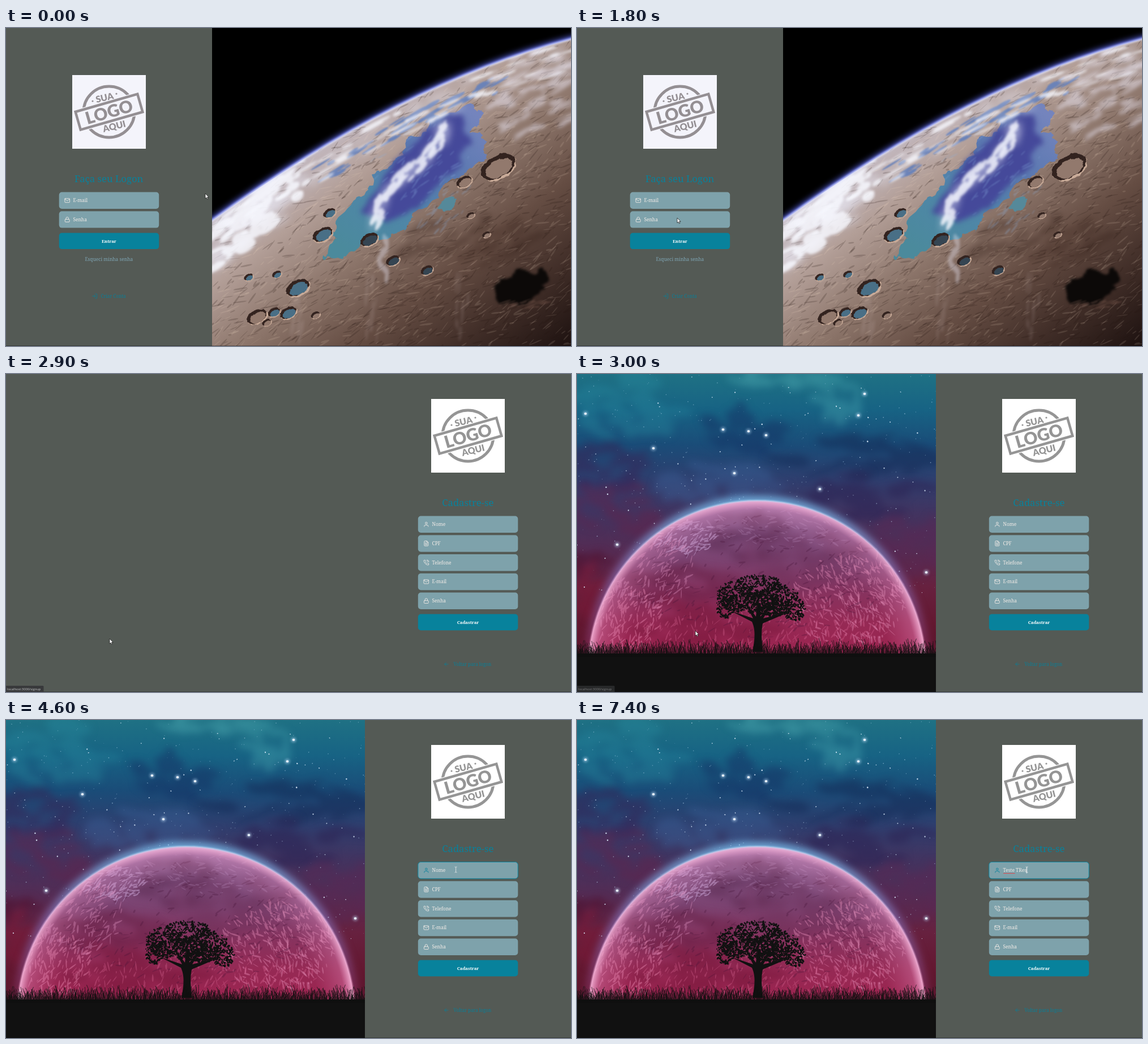
Animation, 998 px wide and 561 px high, one loop 8 s. Source, as an HTML page with a canvas:

```html
<!DOCTYPE html>
<html lang="pt">
<head>
<meta charset="utf-8">
<title>Logon</title>
<style>
  html, body { margin: 0; width: 100%; height: 100%; overflow: hidden; background: #545a55; }
  canvas, svg { position: absolute; left: 0; top: 0; }
  #planet { left: 364px; }
  text { font: 8.4px "Noto Serif", serif; fill: #f4ede8; white-space: pre; }
  .title { font-size: 16.7px; font-weight: 500; fill: #08829c; text-anchor: middle; }
  .action { font-size: 7.7px; font-weight: 700; fill: #fff; text-anchor: middle; }
  .link { --c: #0a7f97; }
  .link.hover { --c: #0c6473; }
  .link text { font-size: 8.1px; fill: var(--c); }
  .stamp text { font-family: Lato, sans-serif; font-weight: 900; text-anchor: middle; fill: var(--ink); }
  #status text { font: 5.8px "Open Sans", sans-serif; fill: #c4c6c8; }
  .line { fill: none; stroke-width: 2; stroke-linecap: round; stroke-linejoin: round; }
</style>
</head>
<body>
<canvas id="planet" width="634" height="561"></canvas>
<canvas id="moon" width="634" height="561"></canvas>
<svg id="ui" width="998" height="561" viewBox="0 0 998 561"></svg>
<script>
const $ = id => document.getElementById(id);
const TEAL = '#08829c', FIELD = '#7ea2ab', PALE = '#f4ede8';

// ---------- seeded drawing helpers ----------
let seed = 4711;
const rnd = () => (seed = seed * 16807 % 2147483647) / 2147483647;
const R = (a, b) => a + (b - a) * rnd();

function soften(g, blur, draw) {
  g.save();
  g.filter = blur ? `blur(${blur}px)` : 'none';
  draw();
  g.restore();
}

// Fill n ellipses, each given by place(i / n) as [x, y, rx, ry, angle].
function scatter(g, color, blur, n, place) {
  soften(g, blur, () => {
    g.fillStyle = color;
    g.beginPath();
    for (let i = 0; i < n; i++) {
      const [x, y, a, b, r = 0] = place(i / n);
      g.moveTo(x + a * Math.cos(r), y + a * Math.sin(r));
      g.ellipse(x, y, a, b, r, 0, 7);
    }
    g.fill();
  });
}

function inEllipse(x, y, rx, ry) {
  const a = R(0, 6.283), d = Math.sqrt(rnd());
  return [x + rx * d * Math.cos(a), y + ry * d * Math.sin(a)];
}

// Closed outline with a ragged, coast-like edge.
function ragged(points, amp) {
  for (let k = 0; k < 4; k++, amp *= .55)
    points = points.flatMap((p, i) => {
      const q = points[(i + 1) % points.length];
      return [p, [(p[0] + q[0]) / 2 + R(-amp, amp), (p[1] + q[1]) / 2 + R(-amp, amp)]];
    });
  const path = new Path2D();
  points.forEach(p => path.lineTo(...p));
  path.closePath();
  return path;
}

function gradient(g, x0, y0, x1, y1, ...colors) {
  const fill = g.createLinearGradient(x0, y0, x1, y1);
  colors.forEach((c, i) => fill.addColorStop(i / (colors.length - 1), c));
  return fill;
}

// ---------- planet ----------
function drawPlanet(g) {
  const limb = new Path2D('M-20 354L0 340Q337 97 634 20L654 15');
  const ground = new Path2D('M0 340Q337 97 634 20V561H0Z');
  const onLimb = t => [674 * t * (1 - t) + 634 * t * t, 340 * (1 - t) ** 2 + 194 * t * (1 - t) + 20 * t * t];
  const rim = (color, width, blur) => soften(g, blur, () => {
    g.strokeStyle = color;
    g.lineWidth = width;
    g.stroke(limb);
  });
  g.fillRect(0, 0, 634, 561);
  rim('#3f479f', 13, 5);
  rim('#7682ec', 6, 2);
  g.save();
  g.clip(ground);
  g.fillStyle = gradient(g, 210, 150, 560, 610, '#c9c2cf', '#b39f98', '#8d766b', '#654d43', '#412e28', '#1f1311');
  g.fillRect(0, 0, 634, 561);

  const streak = () => [R(0, 634), R(0, 561), R(3, 13), R(.4, 1.6), R(-1, -.1)];
  for (let k = 0; k < 3; k++) {
    scatter(g, 'rgba(38,22,18,.2)', 0, 520, streak);
    scatter(g, 'rgba(236,212,194,.13)', 0, 420, streak);
  }
  scatter(g, 'rgba(50,30,24,.3)', 5, 24, () => [...inEllipse(450, 380, 130, 50), R(10, 35), R(3, 9), -.5]);

  // sea
  const sea = ragged([[198, 410], [222, 370], [218, 345], [276, 285], [291, 252], [336, 225], [351, 190], [396, 158],
    [456, 133], [480, 150], [455, 185], [486, 200], [481, 235], [436, 265], [401, 300], [351, 340], [326, 362], [276, 382], [236, 403]], 11);
  g.fillStyle = gradient(g, 430, 130, 250, 400, '#7484bd', '#5a78b0', '#4f86a8', '#4b8a9c');
  g.fill(sea);
  soften(g, 5, () => {
    g.fillStyle = '#45499a';
    g.fill(ragged([[265, 330], [305, 260], [370, 190], [440, 150], [460, 205], [440, 245], [380, 300], [310, 345]], 12));
  });
  scatter(g, 'rgba(140,180,225,.3)', 1, 90, () => [...inEllipse(370, 265, 90, 100), R(3, 12), R(.5, 1.6), R(-1.1, -.4)]);
  scatter(g, '#6b83b8', 1, 45, () => {
    const [x, y] = onLimb(R(.25, .75));
    return [x + R(5, 30), y + R(18, 50), R(6, 22), R(1, 4), -.55];
  });
  g.fillStyle = '#55899a';
  g.fill(ragged([[398, 318], [420, 298], [432, 302], [418, 322]], 5));

  // clouds
  for (const [color, blur, n] of [['rgba(240,242,255,.6)', 7, 45], ['rgba(248,249,255,.8)', 2, 60]]) {
    scatter(g, color, blur, n, t => [R(-10, 30) + 135 * t, 392 - 115 * t + R(-48, 35), R(8, 28), R(3, 9), R(-.8, -.4)]);
    scatter(g, color, blur, n, () => {
      const t = rnd(), [x, y] = onLimb(t), d = R(5, 48);
      return [x + d * .5, y + d, R(8, 30), R(.8, 3.2), -.62 + .35 * t];
    });
    scatter(g, color, blur, n, t => [410 - 130 * t + 14 * Math.sin(t * 7) + R(-9, 9), 170 + 180 * t + R(-8, 8), R(5, 17), R(1.5, 5), R(-1.2, -.7)]);
  }
  scatter(g, 'rgba(236,232,246,.5)', 3, 60, () => [...inEllipse(570, 115, 85, 75), R(6, 28), R(1, 5), R(-.7, -.1)]);
  scatter(g, 'rgba(230,228,240,.4)', 2, 30, t => [302 + 8 * Math.sin(t * 9), 370 + 75 * t, R(1, 3), R(4, 12)]);
  scatter(g, 'rgba(220,205,205,.12)', 2, 40, () => [[150, 280, 440][rnd() * 3 | 0] + R(-12, 12), R(440, 540), R(1, 3), R(8, 22), .1]);

  // craters: x, y, radius, tint
  const craters = [[152, 459, 21, 1], [135, 503, 15, 1], [110, 502, 11, 1], [80, 510, 18, 0], [97, 520, 8, 0],
    [183, 507, 8, 0], [380, 428, 11, 2], [320, 411, 12, 2], [196, 365, 18, 1], [278, 374, 16, 2], [65, 440, 8, 1],
    [115, 435, 8, 1], [457, 331, 7, 0], [485, 365, 7, 0], [506, 246, 31, 0], [208, 327, 11, 1], [446, 272, 14, 0]];
  const tints = ['#92796d', '#496f86', '#354552'];
  for (const [x, y, r, tint] of craters) {
    const oval = (color, dx, dy, k) => {
      g.fillStyle = color;
      g.fill(ragged(Array.from({ length: 10 }, (_, i) => {
        const a = i * .6283, u = r * k * Math.cos(a), v = r * k * .58 * Math.sin(a);
        return [x + dx + u * .88 + v * .47, y + dy - u * .47 + v * .88];
      }), r * .07));
    };
    oval('#c9ab98', 1, 1, 1.1);
    oval('#33231f', -1, -1, 1.08);
    oval(tints[tint], 1, 1, .86);
  }
  soften(g, 2, () => {
    g.fillStyle = '#0c0908';
    g.fill(ragged([[502, 470], [510, 442], [540, 425], [575, 424], [594, 438], [588, 462], [562, 482], [528, 487]], 9));
  });
  scatter(g, 'rgba(140,105,90,.3)', 1, 24, () => [...inEllipse(548, 487, 46, 7), R(4, 12), R(.6, 1.5), -.3]);
  g.restore();
  rim('rgba(224,228,255,.85)', 3, 1.5);
}

// ---------- moon and tree ----------
function drawMoon(g) {
  const cloud = (color, x, y, rx, ry, n = 26) =>
    scatter(g, color, 7, n, () => [...inEllipse(x, y, rx, ry), R(.1, .35) * rx, R(.1, .3) * ry, R(-.4, .4)]);
  g.fillStyle = gradient(g, 0, 0, 0, 500, '#1f7184', '#176384', '#1a4c78', '#2f3e6e', '#43335f', '#552b53', '#67213f', '#641831', '#58142b');
  g.fillRect(0, 0, 634, 561);
  cloud('rgba(85,180,185,.4)', 350, 8, 80, 22);
  cloud('rgba(70,165,175,.4)', 465, 48, 45, 38);
  cloud('rgba(40,140,160,.35)', 90, 60, 90, 55);
  cloud('rgba(20,50,100,.5)', 290, 105, 75, 45);
  cloud('rgba(20,40,85,.5)', 500, 150, 130, 35);
  cloud('rgba(60,100,155,.4)', 250, 195, 100, 40);
  cloud('rgba(55,35,85,.5)', 40, 165, 80, 40);
  cloud('rgba(100,35,75,.45)', 70, 240, 95, 45);
  cloud('rgba(45,38,85,.6)', 520, 215, 110, 40);
  cloud('rgba(90,40,85,.45)', 590, 300, 70, 50);
  cloud('rgba(125,25,55,.5)', 20, 380, 60, 50);
  cloud('rgba(75,15,45,.6)', 15, 335, 45, 20);

  const star = (a, b) => () => {
    const r = R(a, b);
    return [R(0, 634), R(0, 400), r, r * R(.6, 1), R(0, 3)];
  };
  scatter(g, 'rgba(190,220,245,.55)', 0, 420, star(.3, .9));
  scatter(g, 'rgba(225,240,255,.85)', 0, 90, star(.6, 1.4));
  const bright = [[334, 108], [258, 98], [303, 101], [15, 70], [278, 175], [617, 350], [508, 35], [135, 131], [429, 203], [71, 301], [497, 73]];
  scatter(g, 'rgba(200,230,255,.6)', 2, bright.length, t => [...bright[Math.round(t * bright.length)], 4, 4]);
  scatter(g, '#eaf4ff', 0, bright.length, t => [...bright[Math.round(t * bright.length)], 2.4, 2.1]);

  // moon disc
  const disc = new Path2D();
  disc.arc(318, 521, 298, 0, 7);
  soften(g, 7, () => {
    g.strokeStyle = gradient(g, 0, 223, 0, 480, '#6fb0e0', '#7a5a98', '#7a2850');
    g.lineWidth = 16;
    g.stroke(disc);
  });
  g.save();
  g.clip(disc);
  g.fillStyle = gradient(g, 0, 223, 0, 490, '#a377a8', '#805383', '#7b4270', '#86335f', '#952a55', '#9c2450');
  g.fillRect(0, 0, 634, 561);
  cloud('rgba(92,42,80,.55)', 300, 285, 75, 38, 32);
  cloud('rgba(105,45,85,.4)', 400, 330, 110, 50);
  cloud('rgba(100,28,65,.5)', 190, 375, 95, 32);
  cloud('rgba(115,20,55,.5)', 230, 440, 130, 35);
  const veins = (color, x, y, rx, ry, n, tilt) =>
    scatter(g, color, .6, n, () => [...inEllipse(x, y, rx, ry), R(2, 9), R(.5, 1.7), tilt + R(-.7, .7)]);
  veins('rgba(205,170,220,.5)', 190, 288, 55, 32, 130, -.5);
  veins('rgba(235,160,205,.32)', 130, 345, 75, 70, 190, -.9);
  veins('rgba(245,150,190,.36)', 90, 430, 60, 60, 150, -1.2);
  veins('rgba(240,150,195,.36)', 475, 400, 100, 80, 230, .9);
  veins('rgba(245,165,205,.3)', 520, 390, 60, 90, 150, 1.1);
  veins('rgba(225,110,155,.3)', 330, 450, 220, 40, 200, -1.3);
  veins('rgba(200,160,210,.22)', 370, 270, 140, 38, 120, .2);
  veins('rgba(70,20,55,.28)', 320, 360, 230, 110, 240, -.4);
  const edge = g.createRadialGradient(318, 521, 235, 318, 521, 298);
  edge.addColorStop(0, 'rgba(240,140,190,0)');
  edge.addColorStop(.75, 'rgba(240,150,200,.3)');
  edge.addColorStop(1, 'rgba(252,190,225,.85)');
  g.fillStyle = edge;
  g.fillRect(0, 0, 634, 561);
  g.restore();
  soften(g, 1, () => {
    g.strokeStyle = gradient(g, 0, 223, 0, 490, '#a9d4f3', '#dcaadb', '#f0a0c5');
    g.lineWidth = 2;
    g.stroke(disc);
  });

  // tree, ground and grass
  const INK = '#111';
  g.fillStyle = g.strokeStyle = INK;
  g.fill(new Path2D('M310 490C315 465 315 450 309 437L272 418 311 431 292 395 316 428 320 390 324 428 350 396 329 431 375 420 328 440C325 455 326 470 329 490Z'));
  const clumps = [[320, 373, 44, 19], [280, 390, 33, 24], [261, 410, 16, 21], [355, 393, 36, 21], [384, 415, 20, 20], [310, 404, 55, 17], [345, 416, 32, 12]];
  for (const c of clumps) scatter(g, INK, 0, c[2] * 6, () => [...inEllipse(...c), R(.8, 3), R(.7, 2), R(0, 3)]);
  g.fillRect(0, 493, 634, 68);
  g.lineWidth = .7;
  g.beginPath();
  for (let x = -4; x < 638; x += .55) {
    const h = R(4, 16) + R(0, 16) ** 2 / 16, lean = R(-7, 7);
    g.moveTo(x, 499);
    g.quadraticCurveTo(x, 497 - h * .6, x + lean, 497 - h);
  }
  g.stroke();
}

// ---------- interface ----------
const ICONS = {
  mail: 'M4 4h16c1.1 0 2 .9 2 2v12c0 1.1-.9 2-2 2H4c-1.1 0-2-.9-2-2V6c0-1.1.9-2 2-2zM22 6l-10 7L2 6',
  lock: 'M5 11h14a2 2 0 0 1 2 2v7a2 2 0 0 1-2 2H5a2 2 0 0 1-2-2v-7a2 2 0 0 1 2-2zM7 11V7a5 5 0 0 1 10 0v4',
  user: 'M20 21v-2a4 4 0 0 0-4-4H8a4 4 0 0 0-4 4v2M16 7a4 4 0 1 1-8 0a4 4 0 1 1 8 0',
  file: 'M14 2H6a2 2 0 0 0-2 2v16a2 2 0 0 0 2 2h12a2 2 0 0 0 2-2V8zv6h6M16 13H8M16 17H8M10 9H8',
  phone: 'M15 5a5 5 0 0 1 4 4M15 1a9 9 0 0 1 8 8M22 17v3a2 2 0 0 1-2.2 2a20 20 0 0 1-8.6-3a19.5 19.5 0 0 1-6-6a20 20 0 0 1-3.1-8.8A2 2 0 0 1 4.1 2h3a2 2 0 0 1 2 1.7l.7 2.8a2 2 0 0 1-.4 2.1L8.1 9.9a16 16 0 0 0 6 6l1.3-1.3a2 2 0 0 1 2.1-.4l2.8.7a2 2 0 0 1 1.7 2z',
  enter: 'M15 3h4a2 2 0 0 1 2 2v14a2 2 0 0 1-2 2h-4M10 17l5-5-5-5M15 12H3',
  back: 'M19 12H5M12 19l-7-7 7-7'
};
const icon = (name, x, cy, color, id = '') =>
  `<path id="${id}" class="line" d="${ICONS[name]}" stroke="${color}" transform="translate(${x} ${cy - 5.2}) scale(.433)"/>`;
const box = (x, y, h, fill, id = '') => `<rect id="${id}" x="${x}" y="${y}" width="176.5" height="${h}" rx="5" fill="${fill}"/>`;
const field = (x, y, name, label, id = '') => box(x, y, 29.4, FIELD, id && id + 'Box')
  + icon(name, x + 9.3, y + 14.7, PALE, id && id + 'Icon')
  + `<text id="${id}" x="${x + 24.7}" y="${y + 17.7}">${label}</text>`;
const button = (x, y, label) => box(x, y, 28.6, TEAL) + `<text class="action" x="${x + 88.2}" y="${y + 17}">${label}</text>`;
const link = (x, cy, name, label, gap, id = '') =>
  `<g class="link" id="${id}">${icon(name, x, cy, 'var(--c)')}<text x="${x + gap}" y="${cy + 3}">${label}</text></g>`;
const stamp = (x, y, paper, ink) => `<g class="stamp" transform="translate(${x} ${y})" style="--ink:${ink}" stroke="none">
  <rect x="-65" y="-65" width="130" height="130" fill="${paper}"/>
  <circle r="45" fill="none" stroke="${ink}" stroke-width="5"/>
  <text transform="translate(-6.5 -19.5) rotate(-13)" style="font-size:16px">SUA</text>
  <text transform="translate(10.5 31) rotate(-14)" style="font-size:16px">AQUI</text>
  <circle cx="-29" cy="-19" r="1.6" fill="${ink}"/><circle cx="13" cy="-32" r="1.6" fill="${ink}"/>
  <g transform="rotate(-16)"><rect x="-61" y="-20" width="122" height="40" fill="${paper}"/>
  <rect x="-57" y="-16.5" width="114" height="33" fill="${paper}" stroke="${ink}" stroke-width="4.5"/>
  <text y="10.8" style="font-size:30px">LOGO</text></g></g>`;

const signupFields = [['user', 'Nome', 'name'], ['file', 'CPF'], ['phone', 'Telefone'], ['mail', 'E-mail'], ['lock', 'Senha']];
$('ui').innerHTML = `
<g id="login">
  ${stamp(182, 148, '#f4f4fb', '#948f93')}
  <text class="title" x="181.7" y="272">Faça seu Logon</text>
  ${field(93.7, 289.6, 'mail', 'E-mail')}${field(93.7, 323.2, 'lock', 'Senha')}${button(93.7, 361.5, 'Entrar')}
  <text x="181.8" y="411.2" text-anchor="middle" style="fill:#7fa6b5">Esqueci minha senha</text>
  ${link(151.5, 473, 'enter', 'Criar Conta', 16, 'create')}
</g>
<g id="signup">
  ${stamp(816, 109, '#fff', '#959595')}
  <text class="title" x="815.8" y="233">Cadastre-se</text>
  ${signupFields.map(([name, label, id], i) => field(727.8, 250.5 + i * 33.75, name, label, id)).join('')}
  ${button(727.8, 423.6, 'Cadastrar')}
  ${link(772.5, 512, 'back', 'Voltar para logon', 18)}
  <path id="spell" d="M753 270.6h20.6" stroke="#e0474c"/>
  <rect id="caret" y="259.5" width=".9" height="11" fill="#fff"/>
</g>
<rect y="560" width="998" height="1" fill="#000" opacity=".35"/>
<g id="status"><path d="M0 550H65a1.5 1.5 0 0 1 1.5 1.5V561H0Z" fill="#38393b"/><text x="2" y="557.8">localhost:3000/signup</text></g>
<g id="cursor" fill="#fff" stroke="#111" stroke-width=".7" stroke-linejoin="round">
  <path id="arrow" d="M0 0V8.8L2 7 3.4 10 4.8 9.4 3.5 6.5H6.1Z"/>
  <path id="hand" d="M-.9 6.4V.9a.9.9 0 0 1 1.8 0V4.3l3 .7q1.3.3 1.1 1.6l-.5 3.2-.8 2H.3L-2.6 7.5c-.5-.9.5-1.5 1.1-.9Z"/>
  <path id="beam" d="M-2-4.8H-.6L0-4.3.6-4.8H2M0-4.3V4.3M-2 4.8H-.6L0 4.3.6 4.8H2" fill="none" stroke="#ececec" stroke-width=".8"/>
</g>`;

drawPlanet($('planet').getContext('2d'));
drawMoon($('moon').getContext('2d'));

// ---------- timeline ----------
const route = [[0, 352, 292], [600, 352, 292], [1100, 177, 297], [1700, 177, 297], [1800, 177, 335], [2500, 167, 474],
  [2600, 167, 474], [2700, 168.2, 475], [2800, 168.2, 475], [2900, 183, 467], [3000, 209, 453], [3700, 803, 264],
  [3800, 802, 264], [3900, 802, 264], [4000, 796, 264], [4300, 796, 264], [4400, 794.6, 264], [8000, 794.6, 264]];
const keys = [[5900, 'T'], [6000, 'Te'], [6300, 'Tes'], [6500, 'Test'], [6600, 'Teste'], [6800, 'Teste '],
  [7100, 'Teste TR'], [7200, 'Teste TRe'], [7400, 'Teste TRes']];

function pointer(t) {
  const i = Math.max(1, route.findIndex(k => k[0] >= t));
  const [t0, x0, y0] = route[i - 1], [t1, x1, y1] = route[i];
  const p = (t - t0) / (t1 - t0), e = p * p * (3 - 2 * p);
  return [x0 + (x1 - x0) * e, y0 + (y1 - y0) * e];
}

const show = (id, on) => $(id).style.display = on ? '' : 'none';

function frame(now) {
  const t = Math.floor(now % 8000 / 100) * 100;
  const signup = t >= 2900, hover = t >= 2400 && !signup, focus = t >= 4000;
  show('login', !signup);
  show('planet', !signup);
  show('signup', signup);
  show('moon', t >= 3000);
  $('create').classList.toggle('hover', hover);
  show('status', t >= 2500 && t < 3300);
  $('status').setAttribute('opacity', t < 3000 ? 1 : .6);

  $('cursor').setAttribute('transform', `translate(${pointer(t)})`);
  show('hand', hover);
  show('beam', t >= 3700);
  show('arrow', !hover && t < 3700);

  const typed = keys.filter(k => k[0] <= t).pop()?.[1] || '';
  $('name').textContent = typed || 'Nome';
  $('nameBox').setAttribute('stroke', focus ? TEAL : 'none');
  $('nameIcon').setAttribute('stroke', focus ? TEAL : PALE);
  show('spell', t >= 6800);
  show('caret', focus && (typed || t < 4600 || t >= 5100 && t < 5600));
  $('caret').setAttribute('x', 752.4 + (typed && signup ? $('name').getComputedTextLength() : 0));
  requestAnimationFrame(frame);
}
requestAnimationFrame(frame);
</script>
</body>
</html>
```
